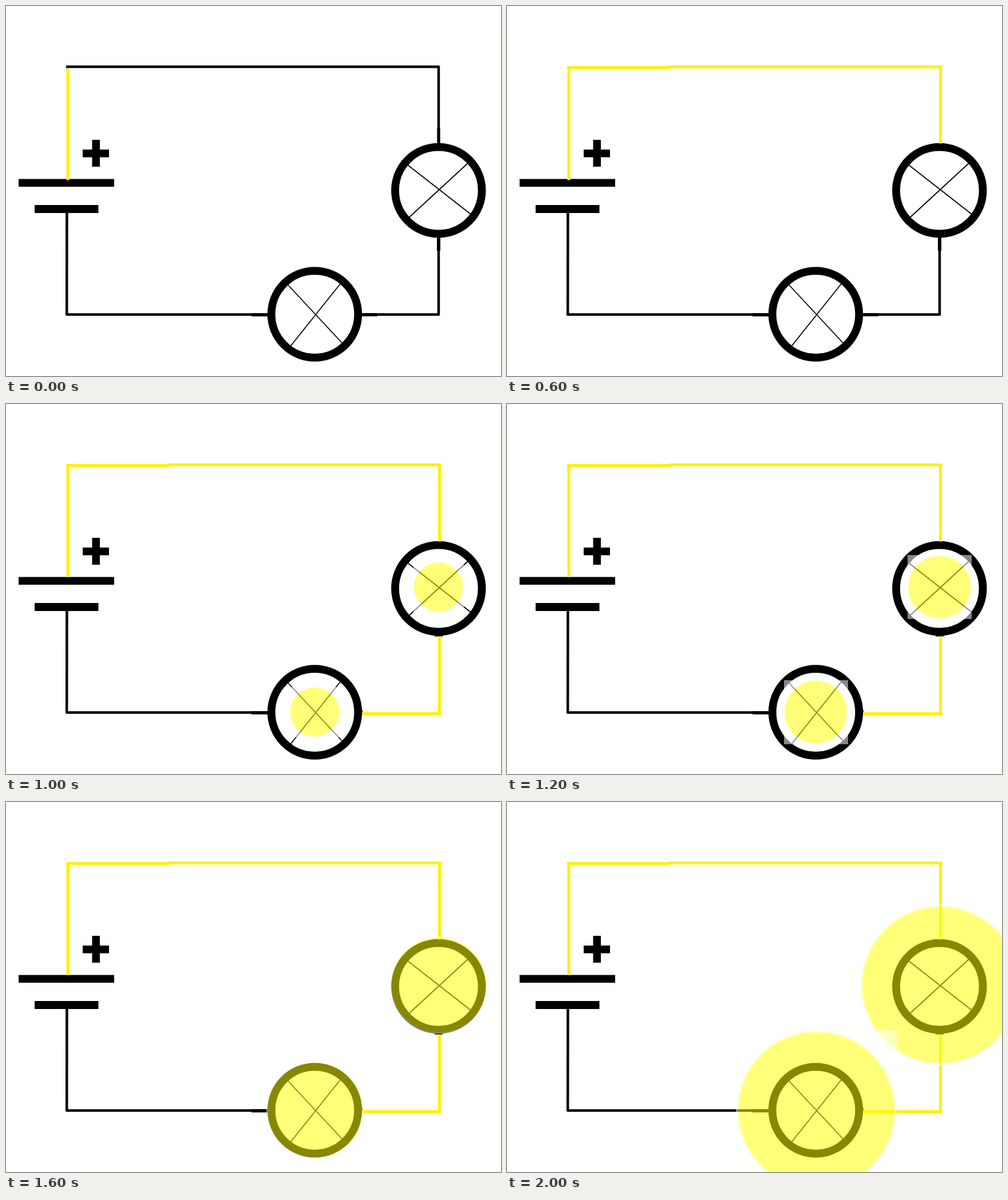
Recreate the animation shown at these times as an HTML page with a canvas. Size 865 px wide and 647 px high, loop 2200 ms.

```html
<!DOCTYPE html>
<html lang="en">
<head>
<meta charset="utf-8">
<title>Series circuit</title>
<style>
  html, body { margin: 0; width: 100%; height: 100%; overflow: hidden; background: #fff; }
  canvas { display: block; }
</style>
</head>
<body>
<canvas id="stage" width="865" height="647"></canvas>
<script>
const ctx = document.getElementById('stage').getContext('2d');
const STEP = 200, STEPS = 11;
const BLACK = '#000', YELLOW = '#fff000';
const TIPS = [107, 285, 500];                 // end of the lit top wire
const GLOWS = [44, 56, 69.5, 85, 108, 140.5]; // half sizes, one per step
const GLOW_START = 5;

const lamps = [
  { x: 755.8, y: 322.5, glowY: 320, cross: [[702, 278, 812, 364], [807, 275, 704, 370]] },
  { x: 539.5, y: 539, glowY: 538.7, cross: [[493, 488, 588, 590], [584, 486, 497, 595]] }
];

function line(color, width, ...pts) {
  ctx.strokeStyle = color;
  ctx.lineWidth = width;
  ctx.beginPath();
  for (let i = 0; i < pts.length; i += 2) ctx.lineTo(pts[i], pts[i + 1]);
  ctx.stroke();
}

function bar(x1, y1, x2, y2) {
  ctx.fillStyle = BLACK;
  ctx.fillRect(x1, y1, x2 - x1, y2 - y1);
}

function drawBattery() {
  bar(22, 302.5, 189, 316);
  bar(50, 348, 161.5, 362);
  bar(134, 251, 180, 264.5);
  bar(150.5, 234, 164, 281);
}

function drawDarkWires(step) {
  line(BLACK, 4.5, 106.4, 361, 106.2, 539.5, 458, 539.5);
  line(BLACK, 5.5, 429, 540, 458, 540);
  if (step < 3) {
    line(BLACK, 4.5, step ? TIPS[step] : 105, 106.3, 756, 106.3, 756, 241);
    line(BLACK, 5.2, 756, 214, 756, 241);
  }
  if (step < 4) {
    line(BLACK, 4.5, 756, 404, 756, 539.5, 620, 539.5);
    line(BLACK, 6, 756, 404, 756, 428);
    line(BLACK, 5.5, 620, 539.8, 649, 539.8);
  } else {
    bar(749, 403, 763, 406.5);
    bar(618, 535, 623, 542);
  }
}

function drawLitWires(step) {
  line(YELLOW, 5, 108, step ? 105 : 109, 108, step < 4 ? 304.5 : 302.5);
  if (step) line(YELLOW, 5, 105, 107.6, 285, 107.6);
  if (step > 1) line(YELLOW, 5, 283, 106.6, step > 2 ? 760.5 : TIPS[step], 106.6);
  if (step > 2) line(YELLOW, 5, 757.5, 104.5, 757.5, 240.5);
  if (step > 3) {
    line(YELLOW, 5, 757.5, 406.5, 757.5, 544.5);
    line(YELLOW, 5, 760.5, 541.5, 622, 541.5);
  }
}

function drawLamp(lamp) {
  ctx.strokeStyle = BLACK;
  ctx.lineWidth = 13.8;
  ctx.beginPath();
  ctx.arc(lamp.x, lamp.y, 75.8, 0, Math.PI * 2);
  ctx.stroke();
  for (const c of lamp.cross) line(BLACK, 1.8, ...c);
}

// A half-transparent square: yellow disc on white, centre drifting with size.
function drawGlow(lamp, r) {
  const x = lamp.x + Math.max(0, (r - 56) / 60), y = lamp.glowY;
  const fill = ctx.createRadialGradient(x, y, 0, x, y, r);
  fill.addColorStop(0, '#ff0');
  fill.addColorStop(0.955, '#ff0');
  fill.addColorStop(0.995, '#fff');
  ctx.globalAlpha = 0.53;
  ctx.fillStyle = fill;
  const left = Math.round(x - r), top = Math.round(y - r), size = Math.round(2 * r);
  ctx.fillRect(left, top, size, size);
  ctx.globalAlpha = 1;
}

function draw(step) {
  ctx.fillStyle = '#fff';
  ctx.fillRect(0, 0, 865, 647);
  ctx.lineJoin = 'round';
  drawDarkWires(step);
  drawBattery();
  lamps.forEach(drawLamp);
  drawLitWires(step);
  if (step >= GLOW_START) {
    lamps.forEach(lamp => drawGlow(lamp, GLOWS[step - GLOW_START]));
  }
}

const start = performance.now();
function tick() {
  const elapsed = performance.now() - start;
  draw(Math.floor(elapsed / STEP) % STEPS);
  requestAnimationFrame(tick);
}
tick();
</script>
</body>
</html>
```
